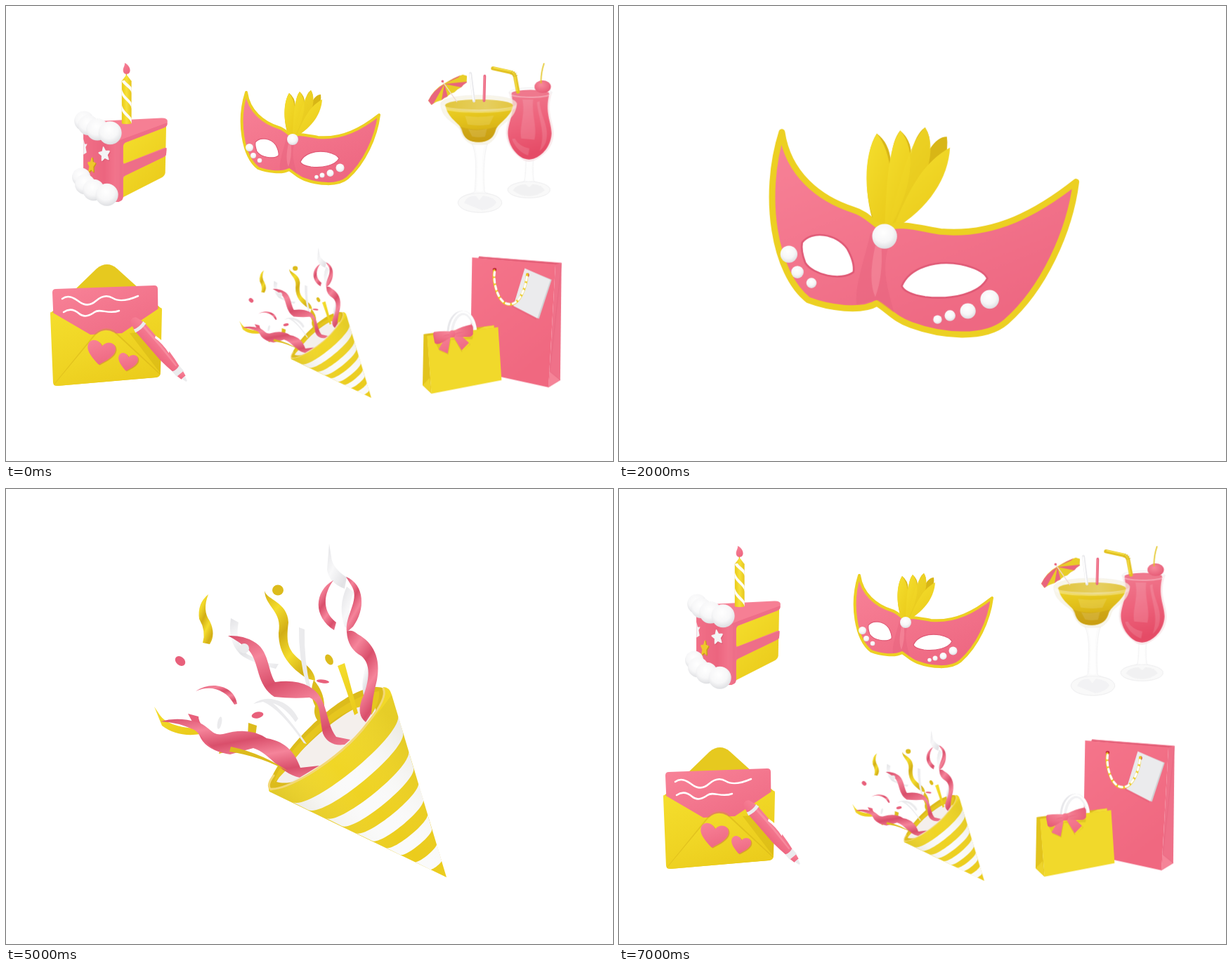
Animation of 864x648 px, one loop 8000 ms. Source, as an HTML page without scripts:

```html
<!DOCTYPE html>
<html lang="en">
<head>
<meta charset="utf-8">
<title>Party icons</title>
<style>
html, body { margin: 0; width: 100%; height: 100%; overflow: hidden; background: #fff; }
svg { display: block; width: 100%; height: 100%; }

.pk { fill: url(#pink); }
.pd { fill: #e8607b; }
.yl { fill: url(#yellow); }
.yd { fill: #dcbb1c; }
.wh { fill: #fff; }
.gr { fill: #ebebed; }
.rp { fill: url(#ribbon-pink); }
.ry { fill: url(#ribbon-yellow); }
.rw { fill: url(#ribbon-white); }
.ball { fill: url(#pearl); }
.glass { fill: #f7f7f8; fill-opacity: .5; stroke: #ececee; stroke-width: 1.5; }
.line { fill: none; stroke-linecap: round; stroke-linejoin: round; }
.soft { fill: #fff; opacity: .13; }

.slide { opacity: 0; animation: show 8s step-end calc(var(--i) * 1s) infinite; }
.grid { animation: overview 8s step-end infinite; }
@keyframes show { 0% { opacity: 1; } 12.5%, 100% { opacity: 0; } }
@keyframes overview { 0% { opacity: 1; } 12.5% { opacity: 0; } 87.5%, 100% { opacity: 1; } }
</style>
</head>
<body>
<svg viewBox="0 0 864 648">
<defs>
  <linearGradient id="pink" x2=".6" y2="1"><stop stop-color="#f88398"/><stop offset="1" stop-color="#ee6882"/></linearGradient>
  <linearGradient id="yellow" x2=".6" y2="1"><stop stop-color="#f5df2e"/><stop offset="1" stop-color="#ebcc1c"/></linearGradient>
  <linearGradient id="ribbon-pink" x2=".12" y2=".25" spreadMethod="reflect"><stop stop-color="#d94f6b"/><stop offset="1" stop-color="#f5849a"/></linearGradient>
  <linearGradient id="ribbon-yellow" x2=".15" y2=".25" spreadMethod="reflect"><stop stop-color="#d2ae16"/><stop offset="1" stop-color="#f4dc2c"/></linearGradient>
  <linearGradient id="ribbon-white" x2=".2" y2=".3" spreadMethod="reflect"><stop stop-color="#e2e2e5"/><stop offset="1" stop-color="#f8f8f9"/></linearGradient>
  <linearGradient id="face"><stop stop-color="#f17088"/><stop offset=".6" stop-color="#ec657f"/><stop offset="1" stop-color="#f47990"/></linearGradient>
  <linearGradient id="wax"><stop stop-color="#e9c916"/><stop offset=".5" stop-color="#f7e13a"/><stop offset="1" stop-color="#e6c51a"/></linearGradient>
  <linearGradient id="drink" x2=".25" y2="1"><stop stop-color="#efd426"/><stop offset=".45" stop-color="#e3c21c"/><stop offset="1" stop-color="#d2a915"/></linearGradient>
  <linearGradient id="surface"><stop stop-color="#e2c63c"/><stop offset=".6" stop-color="#e6cf62"/><stop offset="1" stop-color="#e4c640"/></linearGradient>
  <linearGradient id="punch" x2=".2" y2="1"><stop stop-color="#f07a8f"/><stop offset=".5" stop-color="#ee637c"/><stop offset="1" stop-color="#e54b66"/></linearGradient>
  <linearGradient id="bag" x2=".5" y2="1"><stop stop-color="#f5758b"/><stop offset="1" stop-color="#f06880"/></linearGradient>
  <linearGradient id="cone" x1=".15" y1=".75" x2=".75" y2=".2"><stop stop-color="#806c20" stop-opacity=".18"/><stop offset=".5" stop-color="#fff" stop-opacity="0"/><stop offset="1" stop-color="#807030" stop-opacity=".1"/></linearGradient>
  <radialGradient id="pearl" cx=".45" cy=".35" r=".65"><stop stop-color="#fff"/><stop offset=".6" stop-color="#f7f7f8"/><stop offset="1" stop-color="#dedfe2"/></radialGradient>
  <radialGradient id="fruit" cx=".4" cy=".35" r=".7"><stop stop-color="#f88a9c"/><stop offset="1" stop-color="#e65a75"/></radialGradient>
  <clipPath id="candle"><path d="M423 151Q439 146 455 151V285Q439 290 423 285Z"/></clipPath>
  <path id="star" stroke-width=".22" stroke-linejoin="round" d="M0-.95L.27-.36.9-.29.44.14.56.77 0 .45-.56.77-.44.14-.9-.29-.27-.36Z"/>
  <path id="heart" d="M0 .95C-.55.5-1 .1-1-.35C-1-.95-.3-1.05 0-.5C.3-1.05 1-.95 1-.35C1 .1.55.5 0 .95Z"/>

  <g id="cake">
    <path class="yl" d="M424 345L564 294 561 440Q560 449 551 455L426 519Z"/>
    <path fill="#f67f94" d="M303 300L370 277 548 268Q568 267 568 278L567 289Q566 295 559 298L436 345Q428 349 428 360V405Q428 414 437 410L553 364Q565 358 565 366L564 381Q564 387 556 391L437 448Q428 453 428 463V518Q427 530 411 533H404L303 440Z"/>
    <path fill="#ee6e88" d="M411 345Q414 339 425 335L567 283V289Q566 295 559 298L436 345Q428 349 428 360V518Q427 530 411 533Z"/>
    <path fill="#ee6e88" d="M428 414L565 362 564 381Q564 387 556 391L428 453Z"/>
    <path fill="url(#face)" d="M303 305L408 338Q414 342 413 352L411 533H404L303 440Z"/>
    <path fill="#f0738b" d="M405 340Q414 336 418 345L416 532 404 533Z"/>
    <g fill="#f4f4f6" stroke="#f4f4f6">
      <use href="#star" transform="translate(371 385) rotate(-8) scale(18 23)" fill="#cf4f69" stroke="#cf4f69" opacity=".5"/>
      <use href="#star" transform="translate(369 382) rotate(-8) scale(18 23)"/>
      <path stroke="none" d="M303 334L307 350 315 350 310 360 313 377 303 383Z"/>
    </g>
    <use href="#star" transform="translate(331 419) rotate(4) scale(12 25)" fill="#c99a1a" stroke="#c99a1a"/>
    <use href="#star" transform="translate(328 417) rotate(4) scale(12 24)" fill="#efc82c" stroke="#efc82c"/>
    <g class="ball">
      <circle cx="305" cy="277" r="31"/><circle cx="318" cy="290" r="32"/><circle cx="347" cy="304" r="35"/><circle cx="387" cy="315" r="36.5"/>
      <circle cx="296" cy="454" r="29"/><circle cx="308" cy="477" r="32"/><circle cx="335" cy="495" r="34"/><circle cx="377" cy="510" r="35.5"/>
    </g>
    <path class="line" stroke="#e0c020" stroke-width="3" d="M438.500 128V138"/>
    <path fill="url(#wax)" d="M423 152L436 135Q439 132 442 135L455 152Z"/>
    <g clip-path="url(#candle)">
      <path fill="url(#wax)" d="M423 145H455V290H423Z"/>
      <path fill="#fdfdfb" d="M423 150C428 166 452 172 456 192V174C450 162 436 158 432 146ZM423 190C425 210 452 216 456 242V222C448 206 427 198 423 172ZM423 240C426 260 452 266 456 289V271C448 255 427 248 423 222Z"/>
    </g>
    <path class="pk" d="M433 94C441 97 450 107 450 117C450 125 445 129 439 129C432 129 428 124 428 116C429 107 434 103 433 94Z"/>
  </g>

  <g id="mask" transform="scale(2.2158) translate(-237.4 -42)">
    <path fill="#d8b616" d="M403 187C394 166 395 136 403 124Q411 130 412 142Q413 128 418 122Q425 128 425 137Q428 124 434 120Q438 126 437 134Q442 126 448 126Q450 140 438 160Q426 178 413 186Z"/>
    <path class="yl" d="M404 187C394 167 394 138 403 124C413 136 415 160 408 187Z"/>
    <path class="yl" d="M408 187C409 160 410 133 418 122C429 134 426 160 410 187Z"/>
    <path class="yl" d="M410 187C418 152 425 128 434 120C442 133 437 156 412 187Z" opacity=".8"/>
    <path class="yl" d="M413 186C425 156 434 142 450 133C449 152 437 172 413 186Z"/>
    <path class="pk" stroke="#ecd022" stroke-width="4" stroke-linejoin="round" d="M342 123C346 150 366 166 388 173C398 176 401 183 408 185C417 181 427 184 444 187C479 190 507 174 531 155C527 187 510 224 486 245C472 257 444 254 425 247C414 243 410 237 403 233C393 239 372 236 359 231C337 214 329 164 342 123Z"/>
    <path fill="#e4607b" opacity=".4" d="M399 188C393 212 389 222 390 234L403 231 414 239C409 220 405 208 413 190Z"/>
    <path fill="#fa95a6" opacity=".5" d="M402 196Q397 218 402 229Q407 216 406 197Z"/>
    <g fill="#fff" stroke="#e05a76" stroke-width="1.200">
      <path d="M355 194C361 186 377 188 384 198Q389 207 388 213C380 219 362 215 357 207Q354 199 355 194Z"/>
      <path d="M419 222C424 210 441 205 457 208Q471 211 474 217C469 227 451 231 434 229Q421 227 419 222Z"/>
    </g>
    <g class="ball">
      <circle cx="408" cy="190" r="8"/>
      <circle cx="346.500" cy="201.500" r="5.500"/><circle cx="352" cy="213" r="4"/><circle cx="361" cy="220" r="3.300"/>
      <circle cx="475.500" cy="230.500" r="6"/><circle cx="461.500" cy="238" r="5"/><circle cx="450" cy="241" r="3.500"/><circle cx="442" cy="243.500" r="2.800"/>
    </g>
  </g>

  <g id="drinks">
    <path class="glass" d="M513 384C512 415 511 440 508 453C490 460 457 463 456 480C458 514 587 514 589 480C587 463 555 460 538 453C536 440 534 415 537 384Z"/>
    <ellipse class="glass" cx="522.500" cy="480" rx="66.500" ry="26"/>
    <path fill="#e9e9ec" opacity=".55" d="M472 482Q482 464 512 463L523 472 534 463Q565 465 572 482Q550 500 522 500T472 482Z"/>
    <path class="wh" opacity=".8" d="M514 392H533Q529 420 535 450Q522 456 510 450Q517 420 514 392Z"/>
    <path fill="#fae3e6" fill-opacity=".75" stroke="#eee2e4" d="M460 173C479 230 450 264 451 302C453 345 484 373 508 388Q523 394 540 387C568 372 598 350 600 302C599 265 574 232 595 173Z"/>
    <ellipse class="glass" cx="527.500" cy="173" rx="67.500" ry="15"/>
    <path fill="url(#punch)" d="M467 177C480 238 457 264 456 302C458 343 484 372 508 382Q523 387 538 382C566 371 592 343 594 302C593 264 572 238 587 177Z"/>
    <ellipse cx="527" cy="175" rx="59" ry="10" fill="#ef788d"/>
    <path class="soft" d="M502 195C512 245 492 275 498 318L540 322C550 280 530 245 536 195Z"/>
    <path class="soft" d="M556 200C558 250 590 280 576 330Q570 346 556 358C578 300 552 260 548 204Z"/>
    <path class="soft" d="M469 320C478 348 502 366 520 372L524 350Q490 342 478 318Z"/>
    <path class="line" stroke="#e3c222" stroke-width="12" stroke-linecap="butt" d="M409 97L464 109Q476 112 479 122L488 171"/>
    <path class="line" stroke="#f5df46" stroke-width="4" d="M412 95L464 106Q474 109 478 120L485 167"/>
    <path class="line" stroke="#c9a715" stroke-width="1.300" d="M465 116L471 104M469 117L478 107M472 120L483 112M474 123L486 119"/>
    <ellipse cx="566" cy="155" rx="26" ry="20" fill="url(#fruit)"/>
    <path class="line" stroke="#e2c420" stroke-width="3.500" d="M561 143C560 120 564 100 570 82"/>
    <path fill="#fff" opacity=".3" d="M460 173C466 190 585 190 595 173L593 180C583 194 470 194 463 181Z"/>

    <path class="glass" d="M343 335C362 375 353 455 352 485C345 495 301 494 299 521C304 562 432 562 437 521C434 494 392 495 383 487C379 455 378 375 392 335Z"/>
    <ellipse class="glass" cx="368" cy="521" rx="69" ry="30.500"/>
    <path fill="#ececee" opacity=".55" d="M318 522Q325 499 355 500L366 513 378 499Q413 504 420 520Q408 542 374 544Z"/>
    <path class="wh" opacity=".8" d="M352 339H382Q371 380 377 482Q367 490 357 482Q366 380 352 339Z"/>
    <path fill="#f6f1e0" fill-opacity=".7" stroke="#ece9e0" d="M244 209C248 262 294 268 306 292C313 319 330 333 346 337H389C405 332 420 315 426 291C435 268 479 262 484 209C482 173 246 173 244 209Z"/>
    <path fill="url(#drink)" d="M259 214C266 256 304 270 311 290C316 319 336 330 364 330C395 330 412 315 418 290C426 270 468 250 472 214Z"/>
    <path fill="#b98c10" opacity=".35" d="M304 281Q363 300 424 280Q417 290 414 303Q405 327 364 330Q324 329 313 300Z"/>
    <ellipse cx="365" cy="214" rx="107" ry="19" fill="url(#surface)"/>
    <path class="soft" d="M321 247Q363 254 412 246L398 275Q363 280 329 274Z"/>
    <path class="soft" d="M331 289Q362 295 390 288L384 313Q362 317 343 312Z"/>
    <path class="line" stroke="#e9e9ec" stroke-width="9" stroke-linecap="butt" d="M338 113L349 200"/>
    <path class="line" stroke="#fff" stroke-width="4" d="M337 115L347 197"/>
    <path class="line" stroke="#ea6781" stroke-width="8.500" stroke-linecap="butt" d="M383 121L381 199"/>
    <path class="line" stroke="#f68a9d" stroke-width="3" d="M382 123L380 196"/>
    <path fill="#fff" opacity=".3" d="M244 209C248 233 480 233 484 209L481 221C472 243 256 243 247 221Z"/>
    <path fill="#e8cd27" d="M205 199Q222 162 255 145Q290 124 314 117L327 121 326 142Q315 148 309 157Q296 163 287 173Q273 177 264 187Q254 190 247 197Q230 201 215 212Z"/>
    <path fill="#e9657e" d="M205 199Q219 167 256 146L222 207 215 212ZM256 146L266 185Q254 190 247 197ZM256 146L309 157Q315 148 326 142L327 139Z"/>
    <path fill="#e9657e" d="M262 143L285 129 306 119 300 126Z"/>
    <path class="line" stroke="#f0d9d2" stroke-width="3" d="M252 141L295 202"/>
    <circle cx="250" cy="138" r="4" fill="#e9657e"/>
  </g>

  <g id="letter" transform="scale(2.2158) translate(34.700 -308.300)">
    <path fill="#e6c91f" d="M64 437L129 374Q144 362 158 374L221 431 216 520 70 530Z"/>
    <path class="pk" d="M66 408Q66 403 71 403L211 398Q216 398 216 403L217 490 70 500Z"/>
    <path class="line" stroke="#fff" stroke-width="2.500" d="M80 417C88 411 96 415 104 421S120 427 128 420S144 411 152 416S172 420 188 413M82 436C89 431 97 432 104 438S118 442 126 436S146 440 161 434"/>
    <path class="yl" d="M63 438Q63 434 67 437L120 468 165 466 217 431Q222 428 222 433L220 522Q220 528 214 529L73 541Q67 541 67 536Z"/>
    <path fill="#cda914" opacity=".4" d="M68 539L127 466Q140 455 154 462L220 524 214 529Z"/>
    <path class="yl" d="M68 540L128 468Q140 457 154 465L219 525Q217 529 212 529L74 541Z"/>
    <g fill="#b94e48" opacity=".35">
      <use href="#heart" transform="translate(136.500 494.500) rotate(10) scale(20 18.500)"/>
      <use href="#heart" transform="translate(174.500 508) rotate(12) scale(14 13.500)"/>
    </g>
    <g class="pk">
      <use href="#heart" transform="translate(135 493.500) rotate(10) scale(20 18.500)"/>
      <use href="#heart" transform="translate(173 507) rotate(12) scale(14 13.500)"/>
    </g>
    <path fill="#a88600" opacity=".2" d="M176 466L219 522 221 500 194 464Z"/>
    <g transform="translate(180 445) rotate(49.200)">
      <path class="pk" d="M2-5Q10-8 18-9H70Q84-8 96-6V6Q84 8 70 9H18Q8 8 2 5Q-3 0 2-5Z"/>
      <path fill="#fa9aab" opacity=".6" d="M19-6Q55-7 92-4V-2Q55-4 19-3Z"/>
      <path class="gr" d="M13-9Q17-9 18-10Q21 0 18 10Q15 9 13 9Q16 0 13-9Z"/>
      <path class="wh" d="M40-9Q54-13 69-10L71-7Q55-9 42-6Z"/>
      <path class="gr" d="M94-6.500H104Q106 0 104 6.500H94Q97 0 94-6.500Z"/>
      <path class="pk" d="M104-5.500L111-4V4L104 5.500Z"/>
      <path class="gr" d="M111-3L118-1V1L111 3Z"/>
    </g>
  </g>

  <g id="popper">
    <path class="yd" d="M375 431C367 414 410 354 462 313C505 280 535 275 546 290Q552 305 520 348C485 392 410 440 375 431Z"/>
    <path fill="#f4efec" d="M385 417C397 395 450 335 505 308Q535 300 523 330C495 380 420 428 385 417Z"/>
    <path fill="#e6c61f" d="M381 419C389 389 425 350 464 320Q507 290 531 288Q533 302 520 322Q520 306 501 311Q455 325 399 400Z"/>
    <path class="rw" d="M460 78L463 96Q464 112 485 126L482 142Q460 134 457 115ZM485 139Q472 168 482 196L488 200Q486 168 495 147Z"/>
    <path class="rp" d="M466 130C438 146 437 182 467 201L470 190C451 175 451 153 464 133Z"/>
    <path class="rp" d="M484 125C511 136 512 172 494 196L485 204C482 180 503 160 493 140Z"/>
    <path class="rw" d="M515 248Q503 272 510 298L522 271Z"/>
    <path class="rp" d="M485 203Q492 199 501 207C523 219 534 241 528 272Q521 300 520 320L512 332Q499 322 506 301C519 271 519 249 506 238Q486 227 485 203Z"/>
    <path class="ry" d="M368 145C371 158 401 161 402 190C398 222 402 231 423 247Q440 260 440 273L429 270C405 255 388 236 388 205C394 174 369 168 368 145Z"/>
    <path class="yd" d="M438 272Q453 289 453 309L447 334Q436 323 440 309Q431 292 438 272Z"/>
    <path class="rw" d="M320 184L331 190Q325 220 343 235Q367 250 388 249L384 256Q345 246 333 235Q315 217 320 184Z"/>
    <path class="gr" d="M417 197L425 200Q424 246 434 285L428 281Q416 239 417 197Z"/>
    <path class="yl" d="M472 252L482 248 501 319 496 322Q484 284 472 252Z"/>
    <path class="rp" d="M316 209Q337 208 352 217C375 229 372 258 383 275Q412 271 431 281C460 297 453 330 470 353L490 357 482 364Q459 367 451 348C445 319 449 304 432 297Q408 299 382 296C356 279 361 248 346 230Q332 217 316 209Z"/>
    <path class="gr" d="M352 306Q366 296 382 300Q405 305 416 327L412 332Q398 311 380 305Q401 323 428 363L424 362Q390 313 366 303Z"/>
    <path class="ry" d="M288 150Q272 163 275 185Q285 202 280 219L290 221Q299 207 290 188Q279 173 288 150Z"/>
    <path class="yl" d="M211 310L219 322Q230 338 268 341L277 349Q244 354 222 337Z"/>
    <path class="pd" d="M259 320L274 324Q274 337 297 353L309 376Q282 369 275 350Z"/>
    <path class="yd" d="M345 333L357 337 354 360 344 352ZM303 377L310 352 315 374Z"/>
    <path class="rp" d="M220 331Q245 324 272 332C291 338 292 352 309 349Q346 338 371 355C400 360 412 377 419 397L446 394 418 411C388 404 377 377 352 369L319 378C288 374 284 355 268 343Q244 332 220 331Z"/>
    <path class="yd" d="M320 367Q368 377 407 406L403 403Q364 381 318 374Z"/>
    <path class="rp" d="M270 288C291 273 325 279 329 306L325 307C312 284 290 279 270 288Z"/>
    <ellipse class="yd" cx="387" cy="144" rx="8" ry="7.500"/>
    <ellipse class="pd" cx="248" cy="245" rx="8" ry="6" transform="rotate(40 248 245)"/>
    <ellipse class="pd" cx="358" cy="322" rx="8.500" ry="4.500" transform="rotate(-12 358 322)"/>
    <ellipse class="yd" cx="460" cy="243" rx="5" ry="8" transform="rotate(-30 460 243)"/>
    <ellipse class="pd" cx="451" cy="274" rx="9" ry="2.500" transform="rotate(6 451 274)"/>
    <ellipse class="gr" cx="304" cy="333" rx="3" ry="9" transform="rotate(12 304 333)"/>
    <circle class="gr" cx="339" cy="227" r="7"/>
    <path class="yl" d="M373 424Q375 438 430 407Q485 373 515 333Q544 297 537 282Q546 282 549 293L627 553 375 431Z"/>
    <path fill="#fafafa" d="M408 446C434 459 566 350 558 322L565 346C573 371 454 469 430 457ZM456 469C476 479 580 395 573 373L580 397C586 415 496 489 478 480ZM498 490C514 498 592 434 587 418L594 442C598 455 534 508 521 501ZM541 511C552 516 603 474 600 463L606 484C609 492 569 525 561 521ZM582 531C587 534 615 511 613 505L620 529C621 532 607 543 604 542Z"/>
    <path fill="url(#cone)" d="M375 431Q485 385 549 293L627 553Z"/>
    <path class="line" stroke="#f3d875" stroke-width="3" d="M381 408Q371 421 376 427Q392 429 430 407Q485 373 515 333Q544 297 537 284"/>
  </g>

  <g id="bags">
    <path fill="#d94f69" d="M393 107L653 128 636 133 390 112Z"/>
    <path class="line" stroke="#f27a90" stroke-width="3" d="M394 108L652 128"/>
    <path fill="url(#bag)" d="M371 110L634 131 612 520 440 482 366 400Z"/>
    <path fill="#ef7189" d="M634 131L653 128 649 497 612 520Z"/>
    <path fill="#f58498" d="M616 470L649 497 612 520Z"/>
    <path class="line" stroke="#e25f79" stroke-width="1" d="M653 129L616 470 649 497"/>
    <path fill="#d9506a" opacity=".3" d="M537 150L616 184 573 306 497 266Z"/>
    <path fill="#d2d2d5" d="M539 146L622 180 582 303 574 300Z"/>
    <path fill="#ebebed" d="M537 144L618 180 577 302 501 263Z"/>
    <ellipse cx="442" cy="148" rx="6" ry="5" fill="#b81e2f"/>
    <ellipse cx="546" cy="165" rx="5" ry="6" fill="#c92f42"/>
    <path class="line" stroke="#eccb1e" stroke-width="8" d="M441 151C435 185 452 262 492 258C522 256 541 205 545 163"/>
    <path class="line" stroke="#fff" stroke-width="7" stroke-linecap="butt" stroke-dasharray="11 11" d="M442 156C437 187 452 260 492 257C522 255 541 205 545 161"/>
    <path class="yd" d="M218 352L440 324V335L229 360Z"/>
    <path fill="#f3dc38" d="M410 328L440 324V332L390 337Z"/>
    <g class="line" stroke-linecap="butt">
      <path stroke="#e8e8eb" stroke-width="9" d="M296 341C299 309 313 285 339 282"/>
      <path stroke="#f1f1f3" stroke-width="13" d="M306 342C309 305 328 285 345 285C363 287 377 309 380 341"/>
      <path stroke="#fff" stroke-width="6" d="M301 341C305 303 324 283 343 282C363 284 378 307 382 340"/>
    </g>
    <path fill="#e2c31c" d="M218 352L230 357 243 540 215 513Z"/>
    <path fill="#eed32a" d="M215 513L237 490 243 540Z"/>
    <path fill="#f1d92b" d="M229 357L453 330 464 497 243 540Z"/>
    <path fill="#b48f10" opacity=".25" d="M256 381Q280 390 302 368L318 364 340 407 364 384 340 365 374 358 372 368 345 368 366 384 338 408 316 370 304 369 296 416 268 404Z"/>
    <path class="pk" d="M287 361L265 400 294 413 303 362ZM312 360L338 403 361 379 336 356Z"/>
    <path fill="url(#fruit)" d="M301 343Q276 341 252 345Q247 347 249 358L253 379Q257 385 270 382Q289 372 303 362ZM314 341Q340 327 366 322Q373 322 374 331V351Q373 358 364 360Q340 362 314 359Z"/>
    <path class="pd" opacity=".4" d="M252 345Q247 347 249 358L253 379Q257 385 261 382Q255 372 252 345ZM303 351Q285 352 278 359Q290 357 303 356ZM314 350Q335 343 346 345Q334 350 314 355Z"/>
    <path class="pk" d="M300 343Q308 338 315 341Q320 350 316 360Q309 364 301 362Q297 352 300 343Z"/>
  </g>
</defs>

<rect width="864" height="648" fill="#fff"/>
<g class="grid">
  <use href="#cake" transform="translate(-26.500 38.600) scale(.4513)"/>
  <use href="#mask" transform="translate(237.400 42) scale(.4513)"/>
  <use href="#drinks" transform="translate(508.500 45) scale(.4513)"/>
  <use href="#letter" transform="translate(-34.700 308.300) scale(.4513)"/>
  <use href="#popper" transform="translate(237 308.600) scale(.4513)"/>
  <use href="#bags" transform="translate(496 308.500) scale(.4513)"/>
</g>
<use class="slide" style="--i:1" href="#cake"/>
<use class="slide" style="--i:2" href="#mask"/>
<use class="slide" style="--i:3" href="#drinks"/>
<use class="slide" style="--i:4" href="#letter"/>
<use class="slide" style="--i:5" href="#popper"/>
<use class="slide" style="--i:6" href="#bags"/>
</svg>
</body>
</html>
```
